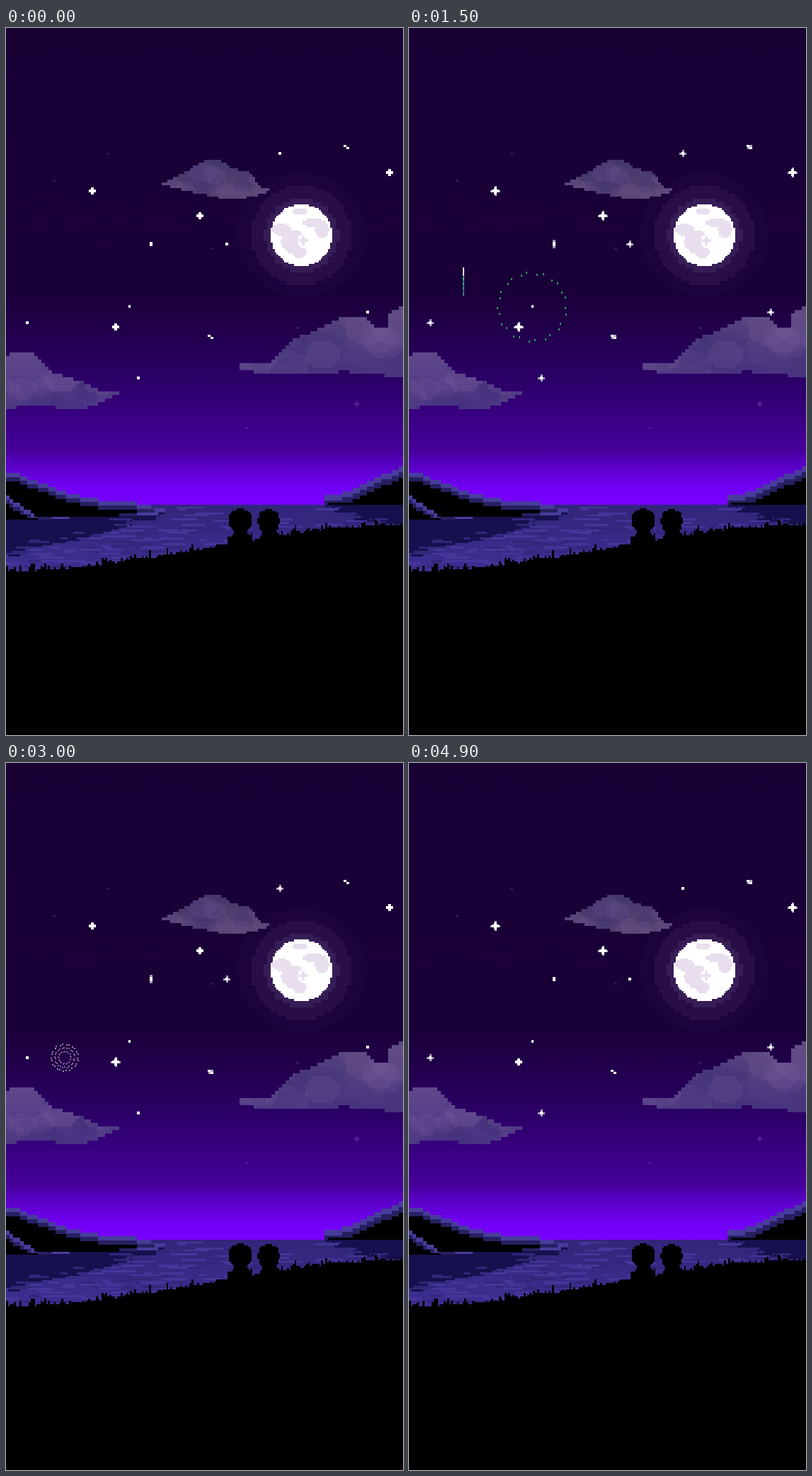
These frames come from a looping animation (561 px wide and 998 px high, 5 s). An HTML page with a canvas:

```html
<!DOCTYPE html>
<html lang="en">
<head>
<meta charset="utf-8">
<title>Night lake</title>
<style>
html, body { margin: 0; width: 100%; height: 100%; overflow: hidden; background: #000; }
canvas { display: block; }
</style>
</head>
<body>
<canvas id="stage" width="561" height="998"></canvas>
<script>
const W = 561, H = 998, LOOP = 5000, STEP = 100, HORIZON = 673, PX = 2.7;
const view = document.getElementById('stage').getContext('2d');

function layer() {
  const c = document.createElement('canvas');
  c.width = W;
  c.height = H;
  return c.getContext('2d');
}
const back = layer();
let g = back;

let seed = 11;
function rand() {
  seed = (seed * 16807) % 2147483647;
  return seed / 2147483647;
}
const range = (a, b) => a + rand() * (b - a);

// Edges land on whole pixels, so rows never leave seams.
function box(x, y, w, h, color) {
  if (color) g.fillStyle = color;
  const left = Math.round(x), top = Math.round(y);
  g.fillRect(left, top, Math.round(x + w) - left, Math.round(y + h) - top);
}
const dot = (x, y, w, h, color) => box(x - w / 2, y - h / 2, w, h, color);

function cross(x, y, size, thick, color) {
  dot(x, y, size, thick, color);
  dot(x, y, thick, size);
}

function ramp(top, bottom, ...stops) {
  const fill = g.createLinearGradient(0, top, 0, bottom);
  stops.forEach(([y, color]) => fill.addColorStop((y - top) / (bottom - top), color));
  return fill;
}

// Fills a polygon as rows of square pixels.
function poly(pts, fill, size) {
  const ys = pts.map(p => p[1]);
  const end = Math.max(...ys);
  for (let y = Math.min(...ys); y < end; y += size) {
    const mid = Math.min(y + size / 2, end - 0.1), cuts = [];
    pts.forEach(([x1, y1], i) => {
      const [x2, y2] = pts[(i + 1) % pts.length];
      if ((y1 > mid) !== (y2 > mid)) cuts.push(x1 + (mid - y1) * (x2 - x1) / (y2 - y1));
    });
    cuts.sort((a, b) => a - b);
    for (let i = 0; i + 1 < cuts.length; i += 2) {
      const [a, b] = [cuts[i], cuts[i + 1]].map(x => Math.round(x / size) * size);
      box(a, y, b - a, Math.min(size, end - y), fill);
    }
  }
}

// Fills an ellipse as rows of square pixels.
function disc(cx, cy, rx, ry, fill, size = PX) {
  const rows = Math.round(2 * ry / size), h = 2 * ry / rows;
  for (let i = 0; i < rows; i++) {
    const k = (i + 0.5) / rows * 2 - 1;
    const half = Math.round(rx * Math.sqrt(1 - k * k) / size) * size;
    box(cx - half, cy - ry + i * h, half * 2, h, fill);
  }
}

function sky() {
  box(0, 0, W, HORIZON, ramp(0, HORIZON, [0, '#180035'], [375, '#1a0038'], [500, '#2c0068'],
    [598, '#46009c'], [612, '#5500be'], [650, '#7200f5'], [HORIZON, '#7900ff']));
  const faint = 'rgba(150,110,200,.2)';
  [[145, 177], [68, 215], [292, 311], [412, 423], [340, 564]].forEach(([x, y]) => dot(x, y, 4, 3, faint));
  cross(495, 530, 9, 3, faint);
}

function moon() {
  const x = 417.5, y = 292.5, r = 43.5, sea = '#e8deed';
  for (let i = 0; i < 3; i++) disc(x, y, 90 - i * 19, 88 - i * 18, `rgba(88,62,118,${0.06 + i * 0.13})`, 5.4);
  disc(x, y, r, r, '#fff');
  disc(x - 2, y - 34, 12, 4, sea);
  disc(x + 18, y - 18, 16, 6, sea);
  disc(x + 29, y - 8, 10, 11, sea);
  disc(x - 28, y - 8, 13, 9, sea);
  disc(x - 11, y + 9, 18, 16, sea);
  disc(x - 3, y + 24, 10, 8, sea);
  disc(x + 4, y + 8, 9, 9, '#fff');
  cross(x + 2.5, y + 7.5, 13, 4, sea);
}

// An outline filled from top to bottom, with soft puffs kept inside it.
function cloud(outline, light, dark, size) {
  const xs = outline.map(p => p[0]), ys = outline.map(p => p[1]);
  const left = Math.min(...xs), right = Math.max(...xs), top = Math.min(...ys), low = Math.max(...ys);
  g = layer();
  poly(outline, ramp(top, low, [top, light], [low, dark]), size);
  g.globalCompositeOperation = 'source-atop';
  for (let i = 0; i < 16; i++) {
    const r = range(0.14, 0.28) * (low - top);
    disc(range(left, right), range(top + r, low), r * 1.4, r,
      i % 2 ? 'rgba(120,90,155,.2)' : 'rgba(55,40,115,.2)', size);
  }
  back.drawImage(g.canvas, 0, 0);
  g = back;
}

function clouds() {
  cloud([[217, 221], [258, 200], [282, 186], [302, 186], [318, 198], [342, 203], [362, 225], [377, 229],
    [338, 241], [300, 240]], '#43366a', '#5b4674', 4);
  cloud([[-5, 465], [8, 458], [40, 458], [64, 486], [100, 497], [138, 513], [160, 515], [112, 538],
    [30, 533], [-5, 538]], '#60488a', '#4a3585', 5);
  cloud([[325, 476], [378, 470], [405, 438], [433, 430], [478, 406], [507, 406], [526, 425], [540, 425],
    [541, 404], [570, 388], [570, 494], [480, 485], [400, 489], [330, 484]], '#5f4c80', '#47337f', 5);
}

function water() {
  const deep = '#15114e', mid = '#31277a';
  box(0, HORIZON, W, 110, ramp(HORIZON, 770, [HORIZON, '#33257a'], [770, '#3d2f92']));
  const streak = (x, y, w, color) => box(x, HORIZON + Math.round((y - HORIZON) / PX) * PX, w, PX, color);
  for (let i = 0; i < 260; i++) {
    const y = range(676, 760);
    streak(range(-20, 550) - (y - 690) * 0.8, y, range(8, 42), rand() < 0.6 ? '#45369a' : mid);
  }
  poly([[0, 688], [228, 684], [165, 706], [75, 726], [0, 743]], deep, PX);
  poly([[448, HORIZON], [570, HORIZON], [570, 704], [500, 690]], deep, PX);
  for (let i = 0; i < 60; i++) {
    const k = rand(), color = i % 2 ? deep : mid;
    if (i < 40) streak(k * 205 - 15, 741 - k * 50 + range(-9, 9), range(10, 34), color);
    else streak(455 + k * 85, 677 + k * 20 + range(-3, 8), range(8, 26), color);
  }
}

// Lit rim, dim rim and black body, each lower than the last.
function slope(ridge, base, drop) {
  ['#483c9c', '#262061', '#000'].forEach((color, i) => {
    const edge = ridge.map(([x, y], n) => [x, Math.min(y + i * drop, base(x))]);
    const floor = ridge.map(([x]) => [x, base(x)]).reverse();
    poly([...edge, ...floor], color, 5);
  });
}

function shores() {
  slope([[-5, 628], [15, 629], [88, 657], [125, 665], [190, 671], [226, 681]], x => 694 - Math.max(0, x) * 0.04, 6);
  slope([[-5, 655], [22, 675], [46, 690]], () => 694, 6);
  slope([[448, 662], [480, 655], [540, 628], [570, 614]], () => HORIZON, 8);
}

function ground() {
  for (let x = 0; x < W; x += PX) {
    const k = x / W;
    const top = 768 - 65 * k * k * (3 - 2 * k);
    const tall = rand() < 0.26 ? range(5, 12) : range(0, 4);
    box(x, Math.round((top - tall) / PX) * PX, PX, H, '#000');
  }
}

function couple() {
  [[331, 695, 17], [371, 696, 15.5]].forEach(([x, y, r]) => {
    disc(x, y, r, 17, '#000');
    dot(x, y + 17, 19, 16);
    disc(x + 1, y + 33, r, 18, '#000');
  });
}

const slow = [['plus', 122, 230], ['plus', 274, 265], ['plus', 542, 204], ['spot', 30, 416],
  ['spot', 511, 401], ['spot', 187, 494], ['pair', 481, 168]];
const quick = [['plus', 155, 422], ['spot', 387, 177], ['spot', 312, 305], ['bar', 205, 305], ['pair', 289, 436]];

const looks = {
  plus(x, y, big) {
    if (big) cross(x, y, 14, 3, '#b9b2c6');
    cross(x, y, 10, 3.4, '#fff');
  },
  spot(x, y, big) {
    if (big) cross(x, y, 10, 3, '#a99fba');
    dot(x, y, 4, 4, '#fff');
  },
  bar(x, y, big) {
    if (big) dot(x, y, 4, 12, '#9d93b0');
    dot(x, y, 3.4, 6, '#fff');
  },
  pair(x, y, big) {
    if (big) dot(x, y, 7, 6, '#b3abc2');
    dot(x - 2, y - 1.5, 3.6, 3.4, '#fff');
    dot(x + 2, y + 1.5, 3.6, 3.4);
  }
};

// The two groups twinkle with different cycles.
function stars(t) {
  const a = t % 3200, b = t % 1600;
  const bigA = a >= 500 && a < 2100, bigB = b >= 800 && b < 1550;
  slow.forEach(([kind, x, y]) => looks[kind](x, y, bigA));
  quick.forEach(([kind, x, y]) => looks[kind](x, y, bigB));
  dot(174.5, 393, 3.4, 3.4, '#fff');
}

const rockets = [
  { x: 174, y: 394, at: 850, trail: '90,190,80', spark: '55,165,95' },
  { x: 77, y: 330, at: 1530, trail: '70,175,165', spark: '70,175,165' },
  { x: 83, y: 416, at: 2745, trail: '190,125,195', spark: '165,150,170' },
  { x: -20, y: 270, at: 2745, trail: '150,150,100', spark: '140,140,95' },
  { x: 37, y: 460, at: 3875, trail: '165,150,110', spark: '225,150,135' }
];
const RISE = 0.264, GROW = 0.076, REACH = 49, LIFE = 880, LAUNCH = 572, RAYS = 26;

function rocket({ x, y, at, trail }, t) {
  const head = y + (at - t) * RISE;
  if (head > LAUNCH) return;
  dot(x, head + 6, 2, 12, '#eee9f5');
  for (let i = 0; i < 4; i++) dot(x, head + 16 + i * 7, 2, 6, `rgba(${trail},${1 - i * 0.1})`);
}

function burst({ x, y, spark }, age) {
  const r = Math.min(REACH, age * GROW);
  const rings = age < 520 ? 3 : 1;
  for (let k = 0; k < rings; k++) {
    g.fillStyle = `rgba(${spark},${(age > 820 ? 0.45 : 0.9) - k * 0.2})`;
    for (let i = 0; i < RAYS; i++) {
      const a = (i + (i % 2 ? -0.14 : 0.14) + k * 0.4) / RAYS * Math.PI * 2;
      const d = r * (1 - k * 0.27) * (i % 2 ? 1 : 0.95);
      dot(x + Math.cos(a) * d, y + Math.sin(a) * d, 2, rings > 1 ? 2 : 3);
    }
  }
}

function fireworks(t) {
  rockets.forEach(r => {
    const age = t - r.at;
    if (age < 0) rocket(r, t);
    else if (age < LIFE) burst(r, age);
  });
}

[sky, moon, clouds, water, shores, ground, couple].forEach(paint => paint());
g = view;

const start = performance.now();
function frame() {
  const t = Math.floor((performance.now() - start) % LOOP / STEP) * STEP;
  g.drawImage(back.canvas, 0, 0);
  fireworks(t);
  stars(t);
  requestAnimationFrame(frame);
}
frame();
</script>
</body>
</html>
```
